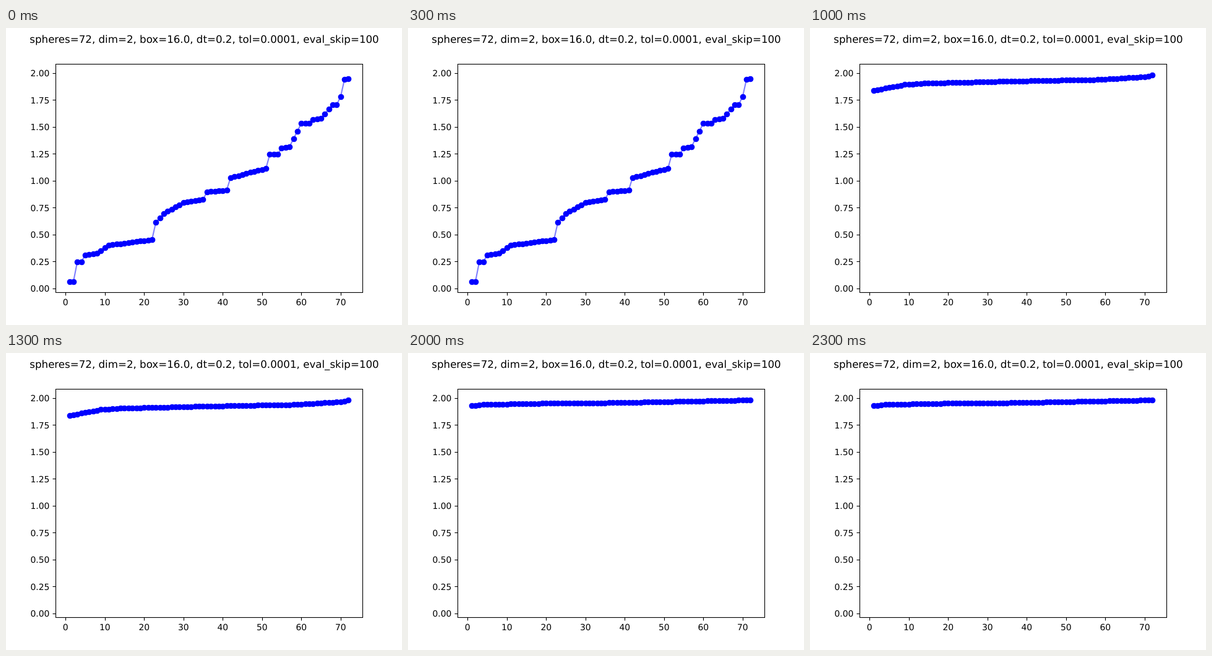
These frames come from a looping animation (640 px wide and 480 px high, 2.5 s). An HTML page with a canvas:

```html
<!DOCTYPE html>
<html lang="en">
<head>
<meta charset="utf-8">
<title>Sorted values</title>
<style>
  html, body { margin: 0; width: 100%; height: 100%; overflow: hidden; background: #fff; }
  canvas { display: block; }
</style>
</head>
<body>
<canvas id="stage" width="640" height="480"></canvas>
<script>
const ctx = document.getElementById('stage').getContext('2d');
const COUNT = 72, STEP_MS = 500;
const BOX = { left: 80.5, right: 576.5, top: 58.5, bottom: 427.5 };
const POINT = 100 / 72; // pixels per typographic point

const xAt = n => 80 + 496 / 22 + (n - 1) * 496 / 78.1;
const yAt = value => 420.85 - 174 * value;
const snap = v => Math.floor(v + 0.5) + 0.5;

// Expands a few (index, y) key points into one height per marker.
function bend(...keys) {
  const heights = [];
  for (let n = 1, k = 0; n <= COUNT; n++) {
    while (keys[k + 1][0] < n) k++;
    const [n0, y0] = keys[k], [n1, y1] = keys[k + 1];
    heights.push(y0 + (y1 - y0) * (n - n0) / (n1 - n0));
  }
  return heights;
}

const scattered = bend([1, 410], [2, 410], [3, 378], [4, 378], [5, 367], [8, 364],
  [11, 351], [22, 342], [23, 314], [25, 300], [30, 282], [35, 277], [36, 265],
  [41, 262], [42, 242], [46, 235], [51, 227], [52, 204], [54, 204], [55, 194],
  [57, 192], [60, 154], [62, 154], [63, 148], [65, 146], [68, 124], [69, 124],
  [70, 111], [71, 83], [72, 82]);
const settling = bend([1, 111.2], [4, 110], [5, 105], [9, 101], [16, 98.4],
  [35, 93.4], [45, 92.8], [60, 86.3], [67, 83.6], [72, 75]);
const closer = bend([1, 101.4], [4, 97.4], [9, 91.4], [14, 89.4], [33, 86.4],
  [58, 83.4], [70, 79], [72, 76]);
const flatter = bend([1, 91], [3, 89.4], [14, 85.4], [37, 82.4], [61, 79.4], [72, 76]);
const settled = bend([1, 85.3], [4, 83.4], [19, 81.4], [37, 80.4], [72, 76]);
const stages = [scattered, settling, closer, flatter, settled];

function line(x0, y0, x1, y1) {
  ctx.beginPath();
  ctx.moveTo(x0, y0);
  ctx.lineTo(x1, y1);
  ctx.stroke();
}

function label(text, x, y, points, align) {
  ctx.font = `${points * POINT}px "DejaVu Sans", sans-serif`;
  ctx.textRendering = 'geometricPrecision';
  ctx.textAlign = align;
  ctx.fillText(text, x, y);
}

function drawCurve(heights) {
  ctx.strokeStyle = 'rgba(0, 0, 255, 0.5)';
  ctx.lineWidth = 1.5 * POINT;
  ctx.lineJoin = 'round';
  ctx.beginPath();
  heights.forEach((y, i) => ctx.lineTo(xAt(i + 1), y));
  ctx.stroke();

  ctx.fillStyle = '#00f';
  heights.forEach((y, i) => {
    ctx.beginPath();
    ctx.arc(snap(xAt(i + 1)), snap(y), 3.5 * POINT, 0, 2 * Math.PI);
    ctx.fill();
  });
}

function drawAxes() {
  ctx.strokeStyle = ctx.fillStyle = '#000';
  ctx.lineWidth = 0.8 * POINT;
  ctx.lineJoin = 'miter';
  ctx.strokeRect(BOX.left, BOX.top, BOX.right - BOX.left, BOX.bottom - BOX.top);
  for (let n = 0; n <= 70; n += 10) {
    const x = snap(xAt(n));
    line(x, BOX.bottom, x, BOX.bottom + 5);
    label(n, xAt(n), 448, 10, 'center');
  }
  for (let value = 0; value <= 2; value += 0.25) {
    const y = snap(yAt(value));
    line(BOX.left - 5, y, BOX.left, y);
    label(value.toFixed(2), 70.3, Math.round(yAt(value) + 5.2), 10, 'right');
  }
  label('spheres=72, dim=2, box=16.0, dt=0.2, tol=0.0001, eval_skip=100', 320.5, 24, 12, 'center');
}

function draw(now) {
  ctx.fillStyle = '#fff';
  ctx.fillRect(0, 0, 640, 480);
  drawCurve(stages[Math.floor(now / STEP_MS) % stages.length]);
  drawAxes();
}

const start = performance.now();
function tick() {
  draw(performance.now() - start);
  requestAnimationFrame(tick);
}
tick();
</script>
</body>
</html>
```
